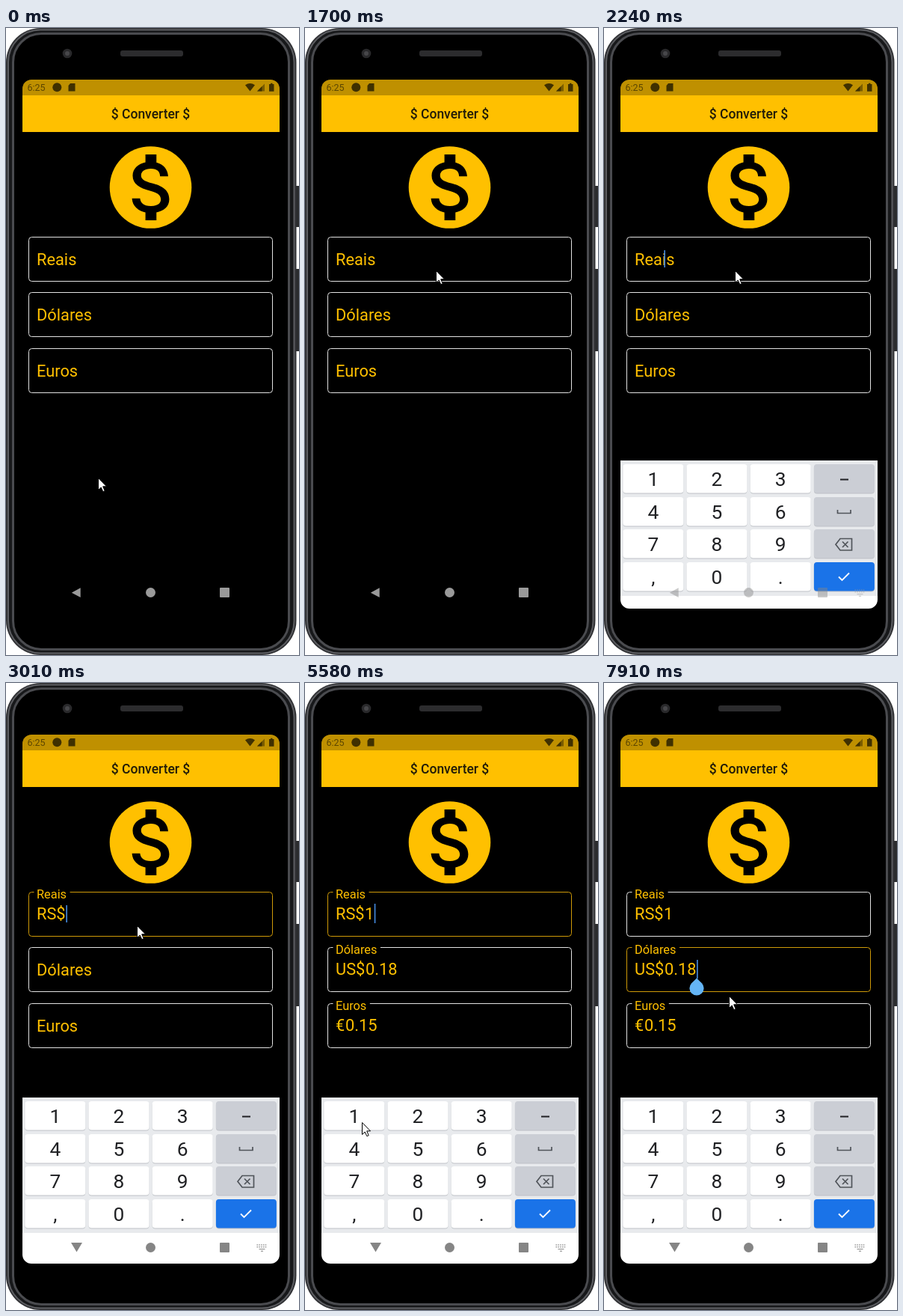
Recreate the animation shown at these times as an HTML page with a canvas. Size 392x838 px, loop 7990 ms.

```html
<!DOCTYPE html>
<html lang="pt">
<head>
<meta charset="utf-8">
<style>
html, body { margin: 0; width: 100%; height: 100%; overflow: hidden; background: #fff; }
canvas { display: block; }
</style>
</head>
<body>
<canvas id="stage" width="392" height="838"></canvas>
<script>
const ctx = document.getElementById('stage').getContext('2d');
const LOOP = 7990;
const AMBER = '#ffc000', INK = '#5c4600', DARK = '#3f3000';
const DOLLAR = new Path2D('M13.41 18.09V20h-2.67v-1.93c-1.71-.36-3.16-1.46-3.27-3.4h1.96c.1 1.05.82 1.87 2.65 1.87 1.96 0 2.4-.98 2.4-1.59 0-.83-.44-1.61-2.67-2.14-2.48-.6-4.18-1.62-4.18-3.67 0-1.72 1.39-2.84 3.11-3.21V4h2.67v1.95c1.86.45 2.79 1.86 2.85 3.39H14.3c-.05-1.11-.64-1.87-2.22-1.87-1.5 0-2.4.68-2.4 1.64 0 .84.65 1.39 2.67 1.91s4.18 1.39 4.18 3.91c-.01 1.83-1.38 2.83-3.12 3.16z');
const ARROW = new Path2D('M0 0V16L3.7 12.5 6.3 18.2 8.7 17.2 6.2 11.3H11Z');

// Pointer moves: start, end, steps, target x, target y
const MOVES = [
  [70, 590, 8, 150, 423], [930, 1300, 6, 160, 376], [1450, 1700, 4, 176, 324],
  [4170, 4240, 2, 181, 335], [4310, 4640, 5, 84, 629], [4710, 4870, 3, 78, 595],
  [4960, 4960, 1, 77, 587], [6290, 6360, 2, 82, 585], [6600, 6670, 2, 88, 595],
  [6740, 6900, 3, 179, 420], [6970, 7040, 2, 167, 390], [7210, 7210, 1, 167, 391],
  [7750, 7910, 3, 168, 418]
];
const TAPS = [[1760, 1910], [5040, 5190], [7360, 7510]];
const CARET = [[2080, 2470], [3010, 3480], [3940, 4410], [4960, 5270], [5420, 5820],
  [6290, 6740], [7280, 7600], [7680, LOOP]];

const within = (t, spans) => spans.some(([a, b]) => t >= a && t < b);

// Fraction completed when a change happens in equal steps, the first at `start`
function stepped(t, start, end, steps) {
  if (t < start) return 0;
  if (t >= end) return 1;
  return (Math.floor((t - start) / (end - start) * (steps - 1)) + 1) / steps;
}

function pointerAt(t) {
  let x = 124, y = 601;
  for (const [start, end, steps, toX, toY] of MOVES) {
    const p = stepped(t, start, end, steps);
    x += (toX - x) * p;
    y += (toY - y) * p;
    if (p < 1) break;
  }
  return [Math.round(x), Math.round(y)];
}

function box(x, y, w, h, r, fill, stroke, line = 1) {
  ctx.beginPath();
  ctx.roundRect(x, y, w, h, r);
  if (fill) { ctx.fillStyle = fill; ctx.fill(); }
  if (stroke) { ctx.strokeStyle = stroke; ctx.lineWidth = line; ctx.stroke(); }
}

function dot(x, y, r, fill) {
  ctx.beginPath();
  ctx.arc(x, y, r, 0, 7);
  ctx.fillStyle = fill;
  ctx.fill();
}

function shape(d, fill, stroke, line = 1.6) {
  const path = new Path2D(d);
  if (fill) { ctx.fillStyle = fill; ctx.fill(path); }
  if (stroke) { ctx.strokeStyle = stroke; ctx.lineWidth = line; ctx.stroke(path); }
}

// Draws text and returns its width
function text(str, x, y, size, fill, align = 'left', weight = 400) {
  ctx.font = `${weight} ${size}px Roboto, sans-serif`;
  ctx.textAlign = align;
  ctx.fillStyle = fill;
  ctx.fillText(str, x, y);
  return ctx.measureText(str).width;
}

function phone() {
  ctx.fillStyle = '#fff';
  ctx.fillRect(0, 0, 392, 838);
  box(386, 211, 6, 55, 0, '#2b2c2e');
  box(386, 322, 6, 110, 0, '#2b2c2e');
  box(0, 0, 388.5, 838, 46, '#303134');
  box(3, 2.5, 382.5, 833, 43, '#17181a', '#5c5d61', 2);
  box(9.5, 7.5, 369, 823, 38, '#000', '#4a4b4f', 3);
  box(153, 30, 84, 8, 3, '#2c2c2e');
  dot(82, 34, 6.3, '#29292b');
  dot(82, 34, 3, '#47474a');
}

function header() {
  box(22, 69, 344, 22, [12, 12, 0, 0], '#bf9000');
  ctx.fillStyle = AMBER;
  ctx.fillRect(22, 90, 344, 49);
  text('6:25', 28.5, 84, 12.5, INK);
  dot(68.3, 79.3, 6, DARK);
  shape('M86 74h6.5v10.5h-9v-7.5z', DARK);
  shape('M320 76.3Q326.5 71.5 333 76.3L326.5 84.5Z', DARK);
  shape('M336 84.5L346 74.5V84.5Z', '#7a5c00');
  shape('M336 84.5L342.5 78V84.5Z', DARK);
  shape('M352 75h2v-1.2h2.5V75h2v9.8H352z', DARK);
  text('$ Converter $', 193.5, 121, 17.5, '#211b08', 'center', 500);
  dot(193.5, 213, 54.8, AMBER);
  ctx.save();
  ctx.translate(127.5, 147);
  ctx.scale(5.5, 5.5);
  ctx.fillStyle = '#000';
  ctx.fill(DOLLAR);
  ctx.restore();
}

function field(row, label, prefix, amount, lift, focused) {
  const y = 279.5 + Math.round(row * 74.4);
  box(30.5, y, 326, 59, 4, null, focused ? '#cf9a08' : '#e2e2e2');
  if (lift > 0) {
    ctx.font = '400 16.35px Roboto, sans-serif';
    ctx.fillStyle = '#000';
    ctx.fillRect(37.5, y - 2, (ctx.measureText(label).width + 8) * lift, 4);
    ctx.globalAlpha = lift;
    const width = text(prefix, 41, y + 36.5, 21.8, AMBER);
    text(amount, 41 + Math.ceil(width), y + 36.5, 21.8, AMBER);
    ctx.globalAlpha = 1;
  }
  text(label, 41, y + 37.5 - 29.5 * lift, 21.8 * (1 - lift / 4), AMBER);
}

function caret(x, y, h) {
  ctx.fillStyle = '#4285d6';
  ctx.fillRect(x, y, 1.7, h);
}

function navigation(color, backDown) {
  shape(backDown ? 'M87 748H102L94.5 760.5Z' : 'M99.7 748.3V761L87.8 754.7Z', color);
  dot(193.5, 754.5, 6.5, color);
  box(286, 748, 13, 13, 1, color);
}

function keyboardIcon() {
  ctx.setLineDash([1.6, 1.2]);
  shape('M335.5 751h14M335.5 753.8h14', null, '#9a9a9a', 1.5);
  ctx.setLineDash([]);
  shape('M338.5 756.7h8M341 759.3h3', null, '#9a9a9a', 1.3);
}

function keyboard(shift, pressed) {
  ctx.save();
  ctx.beginPath();
  ctx.roundRect(22, 500, 344, 276, [0, 0, 12, 12]);
  ctx.clip();
  ctx.translate(0, shift);
  ctx.fillStyle = '#e8eaed';
  ctx.fillRect(22, 554, 344, 181);
  ctx.fillStyle = '#fff';
  ctx.fillRect(22, 735, 344, 60);
  [...'123 456 789 ,0. '].forEach((key, i) => {
    const col = i % 4, row = i >> 2;
    const x = 25.3 + col * 85.2, y = 559 + Math.round(row * 43.6);
    const side = col === 3, enter = i === 15;
    box(x, y + 1, 81, 38.5, 4, '#bfc2c7');
    box(x, y, 81, 38.5, 4, enter ? '#1a73e8' : side ? '#cbced5' : pressed && i === 0 ? '#dcdfe4' : '#fff');
    text(key, x + 40.5, y + 29, 26.3, '#202124', 'center');
  });
  shape('M316 579.5h11', null, '#202124', 2);
  shape('M312.5 620v4.5h17.5v-4.5', null, '#50545a', 1.7);
  shape('M316 658.5h15.5v15.5H316l-6-7.75zM319 662.5l7.5 7.5m0-7.5l-7.5 7.5', null, '#50545a', 1.7);
  shape('M314 709.5l4.5 4.5 9.5-9.5', null, '#fff', 1.8);
  ctx.restore();
  ctx.globalAlpha = shift ? .45 : 1;
  navigation('#858585', !shift);
  keyboardIcon();
  ctx.globalAlpha = 1;
}

function pointer(t) {
  const [x, y] = pointerAt(t);
  if (within(t, TAPS)) dot(x - 1, y, 12, 'rgba(255, 255, 0, .47)');
  ctx.save();
  ctx.translate(x - .5, y + .5);
  ctx.fillStyle = '#fff';
  ctx.fill(ARROW);
  ctx.strokeStyle = '#000';
  ctx.lineWidth = 1;
  ctx.lineJoin = 'round';
  ctx.stroke(ARROW);
  ctx.restore();
}

function draw(t) {
  const typed = t >= 5420, second = t >= 7680;
  const firstLift = stepped(t, 2330, 2470, 3);
  const otherLift = stepped(t, 5420, 5580, 3);
  phone();
  header();
  field(0, 'Reais', 'RS$', typed ? '1' : '', firstLift, firstLift > 0 && !second);
  field(1, 'Dólares', 'US$', '0.18', otherLift, second);
  field(2, 'Euros', '€', '0.15', otherLift, false);

  if (within(t, CARET)) {
    if (second) caret(124, 370, 25);
    else if (typed) caret(92.7, 295, 26);
    else caret(80.3, 297, 23);
  }
  if (second) {
    dot(124, 408, 9.6, '#64b5f6');
    shape('M124 394.5l6.8 6.8h-13.6z', '#64b5f6');
  }

  if (t < 2160) navigation('#9a9a9a', false);
  else keyboard(t < 2240 ? 80 : t < 2330 ? 24 : 0, t >= 5040 && t < 5270);
  pointer(t);
}

function tick(now) {
  draw(now % LOOP);
  requestAnimationFrame(tick);
}
requestAnimationFrame(tick);
</script>
</body>
</html>
```
